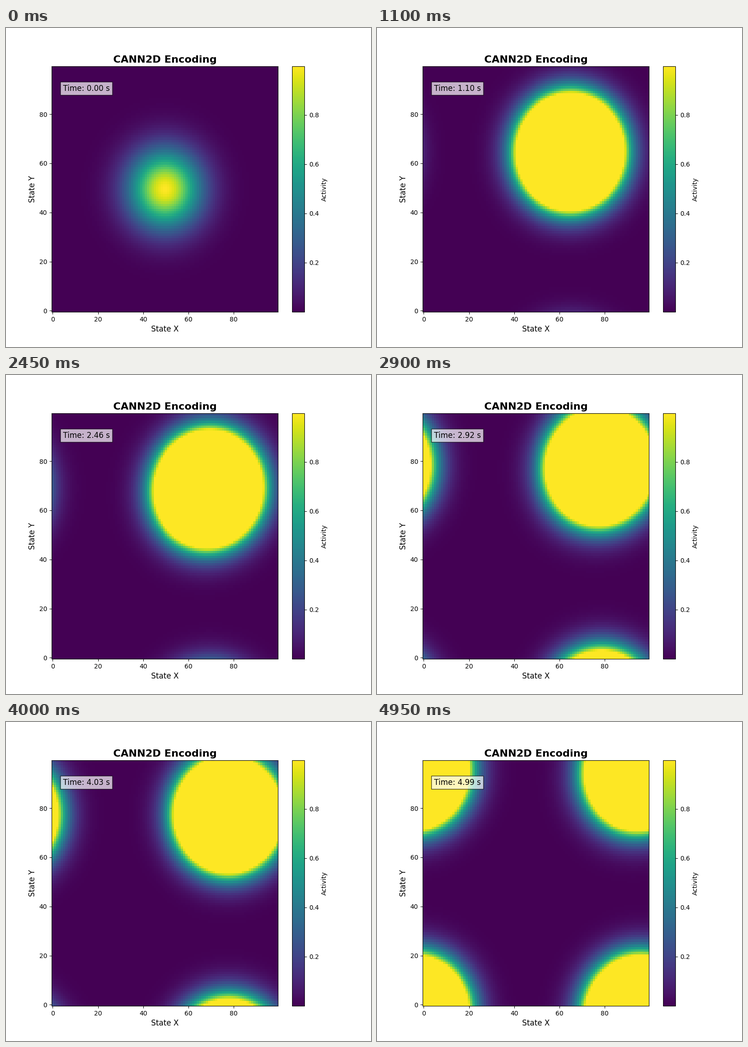
A matplotlib script for the animation above (5000 ms loop, 800 by 700 pixels).

```python
import numpy as np
import matplotlib.pyplot as plt
from matplotlib.animation import FuncAnimation

# Network: 100 x 100 neurons on a periodic square
SIZE = 100
TAU, DT = 1.0, 0.1
K, WIDTH, AMP, J0 = 8.1, 0.5, 10.0, 4.0
WAYPOINTS = [0, 1, 0.75, 2, 1.75, 3]
STEPS_PER_LEG = 100

# Playback
FRAMES, INTERVAL = 100, 50
SECONDS_PER_STEP = 0.01

grid = np.linspace(-np.pi, np.pi, SIZE)


def wrap(d):
    """Map a distance onto the period [-pi, pi)."""
    return (d + np.pi) % (2 * np.pi) - np.pi


def bump(d, rate):
    """Round 2D Gaussian from the same 1D offsets on both axes."""
    g = np.exp(-rate * (d / WIDTH) ** 2)
    return np.outer(g, g)


def simulate():
    """Activity after every step while the stimulus visits the waypoints."""
    path = np.concatenate([np.linspace(a, b, STEPS_PER_LEG)
                           for a, b in zip(WAYPOINTS, WAYPOINTS[1:])])
    kernel = J0 * bump(wrap(grid - grid[0]), 0.5) / (np.sqrt(2 * np.pi) * WIDTH)
    kernel_ft = np.fft.rfft2(kernel)
    u = np.zeros((SIZE, SIZE))
    history = []
    for pos in path:
        sq = u ** 2
        rate = sq / (1 + K * sq.sum())
        recurrent = np.fft.irfft2(np.fft.rfft2(rate) * kernel_ft, s=u.shape)
        stimulus = AMP * bump(wrap(grid - pos), 0.25)
        u = u + (-u + recurrent + stimulus) * DT / TAU
        history.append(u)
    return history


activity = simulate()
steps = np.linspace(0, len(activity) - 1, FRAMES).astype(int)

plt.rcParams["font.family"] = "DejaVu Sans"
fig, ax = plt.subplots(figsize=(8, 7), dpi=100)
im = ax.imshow(activity[0], origin="lower", aspect="auto", cmap="viridis",
               vmin=activity[0].min(), vmax=activity[0].max())
fig.colorbar(im, ax=ax, label="Activity")
ax.set_title("CANN2D Encoding", fontsize=16, fontweight="bold")
ax.set_xlabel("State X", fontsize=12)
ax.set_ylabel("State Y", fontsize=12)
clock = ax.text(0.05, 0.9, "", transform=ax.transAxes, fontsize=12,
                color="black", bbox=dict(facecolor="white", alpha=0.7))


def update(i):
    step = steps[i]
    im.set_data(activity[step])
    clock.set_text(f"Time: {step * SECONDS_PER_STEP:.2f} s")
    return im, clock


anim = FuncAnimation(fig, update, frames=FRAMES, interval=INTERVAL, repeat=True)
plt.show()
```
